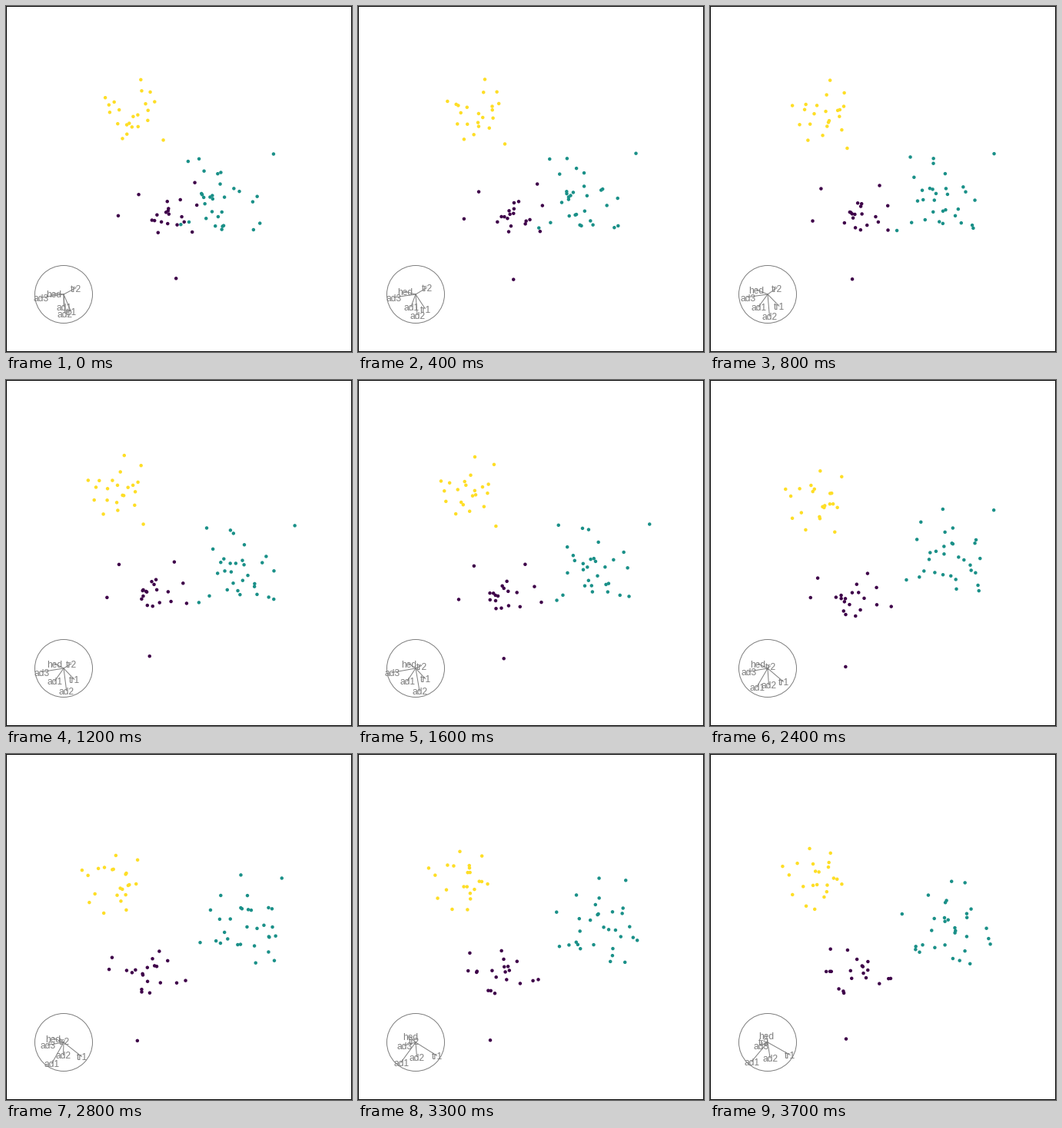
Write a matplotlib script that moves like this. It is 450x450 px and loops after 3800 ms.

```python
import numpy as np
import matplotlib.pyplot as plt
from matplotlib.animation import FuncAnimation
from matplotlib.patches import Circle, Rectangle

SIZE, FRAMES, INTERVAL = 450, 38, 100
CENTRE, SCALE = 225, 225
DIAL, RADIUS = np.array([75, 375]), 37.5
GREY = "#7f7f7f"

# Path of each axis tip from the dial centre, in pixels (x right, y down).
KEY_FRAMES = [0, 8, 16, 28, 37]
TIP_PATHS = {
    "tr1": [(9, 21.5), (15, 15.5), (12.5, 13.5), (23.5, 18.5), (29, 16.5)],
    "tr2": [(16, -8.5), (12, -8.5), (7.5, -3.5), (1, -2.5), (-5, -1.5)],
    "hed": [(-13, -1), (-15, -6.5), (-9.5, -6.5), (-14, -5.5), (-2, -9.5)],
    "ad1": [(0, 15.5), (-12, 16.5), (-11, 16.5), (-15.5, 27.5), (-21, 25.5)],
    "ad2": [(1.5, 24.5), (2.5, 28.5), (5, 29.5), (-.5, 16.5), (3, 20.5)],
    "ad3": [(-30, 4.5), (-26, 3.5), (-31, 5.5), (-21, 3.5), (-9, 4.5)],
}
TIPS = np.array(list(TIP_PATHS.values()))

# Colour, number of points, spread and mean of the six variables.
GROUPS = [
    ("#3e0049", 21, .105, [.51, .58, .53, .73, .76, .70]),
    ("#1a9088", 31, .125, [.66, .31, .39, .21, .78, .29]),
    ("#fede26", 22, .090, [.13, .46, .57, .54, .26, .73]),
]


def orthonormal(matrix):
    """Nearest matrix with orthonormal columns."""
    u, _, vt = np.linalg.svd(matrix, full_matrices=False)
    return u @ vt


def basis(frame):
    """6x2 projection, turning evenly from one key to the next."""
    return orthonormal([[np.interp(frame, KEY_FRAMES, coord) for coord in path.T]
                        for path in TIPS])


def build_cloud():
    """Three round clusters in six dimensions, centred on the origin."""
    rng = np.random.default_rng(4)
    clusters = []
    for _, count, spread, mean in GROUPS:
        noise = rng.normal(size=(count, 6))
        noise = orthonormal(noise - noise.mean(axis=0)) * np.sqrt(count)
        clusters.append(mean + spread * noise)
    points = np.vstack(clusters)
    return points - points.mean(axis=0)


cloud = build_cloud()
colors = [color for color, count, *_ in GROUPS for _ in range(count)]

plt.rcParams["font.family"] = "Liberation Sans"
fig = plt.figure(figsize=(SIZE / 72, SIZE / 72), dpi=72, facecolor="white")
ax = fig.add_axes([0, 0, 1, 1])
ax.set(xlim=(0, SIZE), ylim=(SIZE, 0))
ax.axis("off")
ax.add_patch(Rectangle((.5, .5), SIZE - 1, SIZE - 1, fill=False, ec="black",
                       lw=1, snap=False))
ax.add_patch(Circle(DIAL, RADIUS, fill=False, ec=GREY, lw=1))
spokes = [ax.plot([], [], color=GREY, lw=1)[0] for _ in TIP_PATHS]
names = [ax.text(0, 0, name, color=GREY, size=12, ha="center", va="baseline")
         for name in TIP_PATHS]
dots = ax.scatter(*(CENTRE + SCALE * cloud @ basis(0)).T, s=20, c=colors, lw=0,
                  zorder=3)


def update(frame):
    proj = basis(frame)
    dots.set_offsets(CENTRE + SCALE * cloud @ proj)
    for spoke, name, (x, y) in zip(spokes, names, DIAL + RADIUS * proj):
        spoke.set_data([DIAL[0], x], [DIAL[1], y])
        name.set_position((x + .3, y + 5))
    return [dots, *spokes, *names]


anim = FuncAnimation(fig, update, frames=FRAMES, interval=INTERVAL,
                     repeat=True, repeat_delay=0, blit=False)
plt.show()
```
